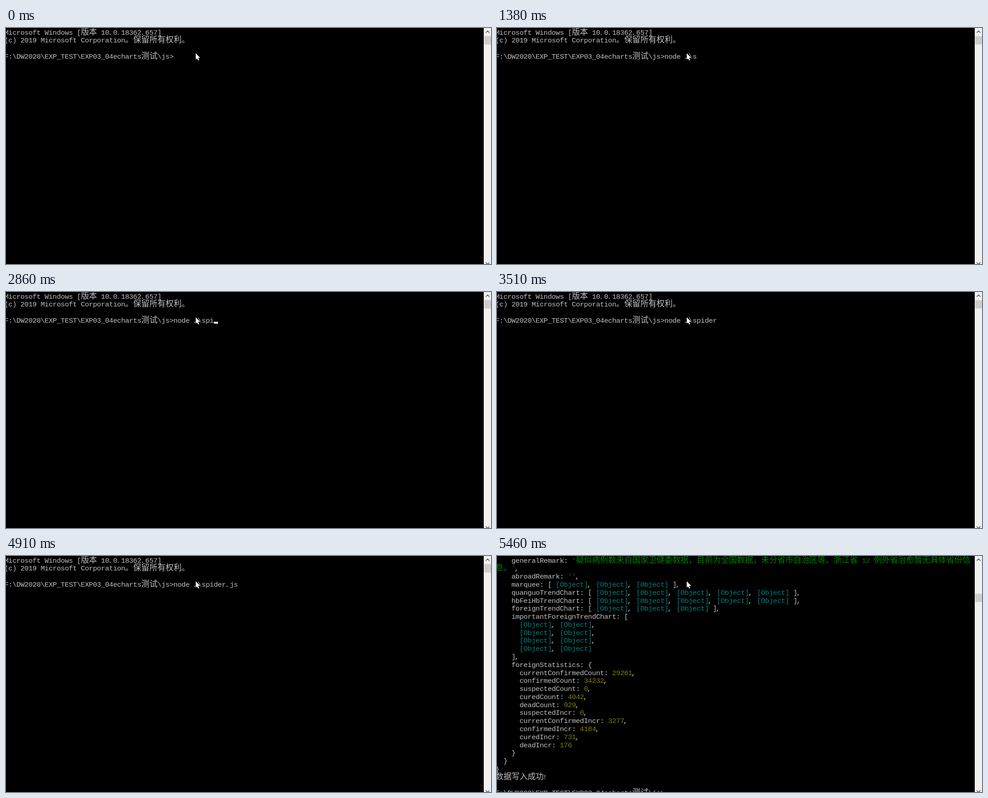
These frames come from a looping animation (1071x523 px, 5630 ms). An HTML page with a canvas:

```html
<!DOCTYPE html>
<html lang="zh-CN">
<head>
<meta charset="utf-8">
<title>Terminal</title>
<style>
  html, body { margin: 0; width: 100%; height: 100%; overflow: hidden; background: #000; }
  canvas { display: block; }
</style>
</head>
<body>
<canvas id="stage" width="1071" height="523"></canvas>
<script>
const ctx = document.getElementById('stage').getContext('2d');
const LOOP = 5630, BLINK = 550;
const LINE = 17.78, CELL = LINE / 2, LEFT = -3.4, BASELINE = 14.6;
const GREY = '#c0c0c0', GREEN = '#008000', OLIVE = '#808000', TEAL = '#008080';
const LATIN = '15.5px "Liberation Mono", monospace';
const HAN = `300 ${LINE}px "Noto Sans CJK SC", "Noto Sans CJK", sans-serif`;

const prompt = String.raw`F:\DW2020\EXP_TEST\EXP03_04echarts测试\js>`;
const PROMPT_CELLS = 42, PROMPT_ROW = 3;
const banner = `Microsoft Windows [版本 10.0.18362.657]
(c) 2019 Microsoft Corporation。保留所有权利。

${prompt}`;

const recordEnd = locationId => `      operator: 'lumoqinghan',
      locationId: ${locationId},
      countryShortCode: ''
    }`;
const provinces = `${recordEnd(110000)},
    {
      id: 956556,
      createTime: 1583843331000,
      modifyTime: 1583843331000,
      tags: '确诊 444 例，疑似病例数待确认，治愈 28 例，死亡 17 例',
      countryType: 1,
      continents: '',
      provinceId: '42',
      provinceName: '湖北省',
      provinceShortName: '湖北',
      cityName: '',
      currentConfirmedCount: 16995,
      confirmedCount: 67760,
      suspectedCount: 0,
      curedCount: 47741,
      deadCount: 3024,
      comment: '',
      sort: 1,
${recordEnd(420000)}
  ],
  getAreaStat: [
    {
      p`;

const objects = n => Array(n).fill('[Object]').join(', ');
const summary = `    generalRemark: '疑似病例数来自国家卫健委数据，目前为全国数据，未分省市自治区等。浙江省 12 例外省治愈暂无具体省份信
息。',
    abroadRemark: '',
    marquee: [ ${objects(3)} ],
    quanguoTrendChart: [ ${objects(5)} ],
    hbFeiHbTrendChart: [ ${objects(5)} ],
    foreignTrendChart: [ ${objects(3)} ],
    importantForeignTrendChart: [
${Array(4).fill('      ' + objects(2)).join(',\n')}
    ],
    foreignStatistics: {
      currentConfirmedCount: 29261,
      confirmedCount: 34232,
      suspectedCount: 0,
      curedCount: 4042,
      deadCount: 929,
      suspectedIncr: 0,
      currentConfirmedIncr: 3277,
      confirmedIncr: 4184,
      curedIncr: 731,
      deadIncr: 176
    }
  }
}
数据写入成功!

${prompt}`;

// Runs of keys at an even pace; the caret stays lit for `hold` ms after each run, then blinks.
const bursts = [
  { keys: 'n', start: 80, gap: 75, hold: 310 },
  { keys: 'ode .\\', start: 230, gap: 76, hold: 310 },
  { keys: 's', start: 1070, gap: 75, hold: 310 },
  { keys: 'p', start: 2630, gap: 75, hold: 310 },
  { keys: 'ider', start: 2860, gap: 166, hold: 150 },
  { keys: '.js', start: 4060, gap: 75, hold: 150 },
  { keys: '\n', start: 4760, gap: 75, hold: 150 }
];

function tokenColor(token) {
  if (token[0] === "'") return GREEN;
  if (token === '[Object]') return TEAL;
  return /^\d+$/.test(token) ? OLIVE : GREY;
}

// Every glyph sits in its terminal cell; Han characters take two cells.
function drawText(text) {
  let col = 0, row = 0;
  ctx.textAlign = 'center';
  for (const token of text.split(/('[^']*'|\[Object\]|(?<=: )\d+)/)) {
    ctx.fillStyle = tokenColor(token);
    for (const char of token) {
      if (char === '\n') { col = 0; row++; continue; }
      const span = char > '\u2e80' ? 2 : 1;
      const shift = '.,!'.includes(char) ? -2 : 0;
      ctx.font = span === 2 ? HAN : LATIN;
      ctx.fillText(char, LEFT + (col + span / 2) * CELL + shift, BASELINE + row * LINE);
      col += span;
    }
  }
}

function drawCaret(col, row) {
  ctx.fillStyle = '#fff';
  ctx.fillRect(Math.round(LEFT + col * CELL), Math.round(12.7 + row * LINE), 9, 4);
}

function drawPrompt(t) {
  const begun = bursts.filter(burst => burst.start <= t);
  const typed = begun.map(({ keys, start, gap }) =>
    keys.slice(0, 1 + Math.floor((t - start) / gap))).join('');
  drawText(banner + typed);
  if (!begun.length) return;

  const { keys, start, gap, hold } = begun.at(-1);
  const idle = t - start - gap * (keys.length - 1) - hold;
  const lit = idle < 0 || Math.floor(idle / BLINK) % 2 === 1;
  if (!lit) return;
  if (typed.endsWith('\n')) drawCaret(0, PROMPT_ROW + 1);
  else drawCaret(PROMPT_CELLS + typed.length, PROMPT_ROW);
}

function drawChevron(y) {
  ctx.beginPath();
  ctx.moveTo(1059.5, y + 4);
  ctx.lineTo(1063.5, y);
  ctx.lineTo(1067.5, y + 4);
  ctx.strokeStyle = '#505050';
  ctx.lineWidth = 1.6;
  ctx.stroke();
}

function drawScrollbar(thumbY) {
  ctx.fillStyle = '#f0f0f0';
  ctx.fillRect(1055, 0, 16, 523);
  ctx.fillStyle = '#cdcdcd';
  ctx.fillRect(1056, thumbY, 15, 18.5);
  drawChevron(6.5);
  ctx.save();
  ctx.scale(1, -1);
  drawChevron(-523.5);
  ctx.restore();
}

const pointer = new Path2D('M419 56v14l3-2.8 2.3 4.8 2.2-1-2.2-4.7 4.2-.3z');
function drawPointer() {
  ctx.strokeStyle = '#000';
  ctx.lineWidth = 2;
  ctx.stroke(pointer);
  ctx.fillStyle = '#fff';
  ctx.fill(pointer);
}

const screens = [
  { start: 0, thumbY: 18, paint: drawPrompt },
  { start: 5390, thumbY: 57, paint: () => drawText(provinces) },
  { start: 5460, thumbY: 83.5, paint: () => drawText(summary) }
];

function draw(t) {
  const screen = screens.findLast(({ start }) => start <= t);
  ctx.fillStyle = '#000';
  ctx.fillRect(0, 0, 1071, 523);
  screen.paint(t);
  drawScrollbar(screen.thumbY);
  drawPointer();
}

const begin = performance.now();
function tick() {
  draw((performance.now() - begin) % LOOP);
  requestAnimationFrame(tick);
}
tick();
</script>
</body>
</html>
```
